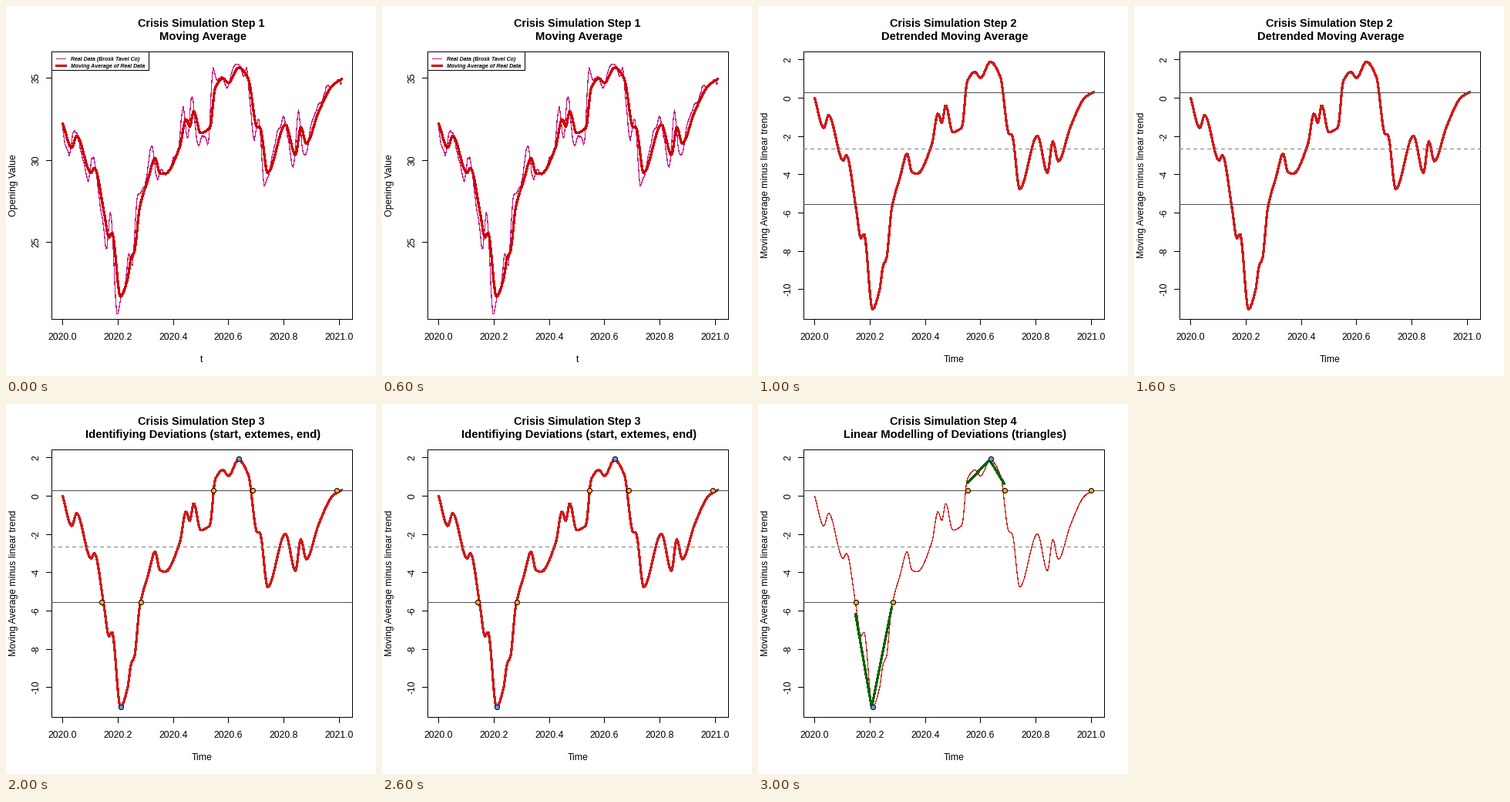
A matplotlib script that plays this animation: 480x480 px, repeating every 4 s.

```python
import numpy as np
import matplotlib.pyplot as plt
from matplotlib.animation import FuncAnimation
from matplotlib.patches import Rectangle

plt.rcParams.update({"font.family": "Liberation Sans", "path.simplify": False,
                     "toolbar": "None"})

RED, VIOLET, GREEN = "#CD0000", "#C71585", "#006400"
TREND_RED, ORANGE, BLUE = "#CD1C1C", "#FFA51A", "#6495ED"
LEFT, RIGHT, TOP, BOTTOM = 59, 449, 59, 406
UPPER, MIDDLE, LOWER = 112, 185, 257
START, END = 73, 435

# Turning points of the detrended average, in stage pixels.
TURNS = [(73, 119), (85, 158), (91, 141), (110, 200), (114, 193), (127, 264),
         (133, 301), (137, 295), (148, 393), (157, 369), (162, 336),
         (166, 328), (173, 262), (184, 221), (193, 191), (199, 215),
         (206, 217), (225, 179), (233, 139), (238, 151), (243, 128),
         (252, 163), (264, 157), (271, 97), (281, 85), (288, 93), (301, 72),
         (314, 92), (325, 165), (329, 167), (339, 237), (362, 168),
         (375, 216), (382, 175), (389, 201), (405, 156), (423, 119),
         (435, 111)]

SUBTITLES = ["Moving Average", "Detrended Moving Average",
             "Identifiying Deviations (start, extemes, end)",
             "Linear Modelling of Deviations (triangles)"]


def year_x(years):
    return START + 359 * years


def price_y(value):
    return 93 + (35 - value) * 21.33


def trend_y(value):
    return 119 - value * 24.83


def detrended(x):
    """Monotone cubic curve through the turning points."""
    px, py = np.array(TURNS, float).T
    step = np.diff(px)
    slope = np.diff(py) / step
    before, after = slope[:-1], slope[1:]
    product = before * after
    total = np.where(product > 0, before + after, 1)
    tangent = np.zeros(len(px))
    tangent[1:-1] = np.where(product > 0, 2 * product / total, 0)
    tangent[0], tangent[-1] = slope[0], slope[-1]

    x = np.clip(x, START, END)
    i = np.clip(np.searchsorted(px, x) - 1, 0, len(step) - 1)
    t = (x - px[i]) / step[i]
    eased = t * t * (3 - 2 * t)
    bend = t * (1 - t) * ((1 - t) * tangent[i] - t * tangent[i + 1])
    return py[i] + (py[i + 1] - py[i]) * eased + step[i] * bend


def moving_average(x):
    """Add the linear trend back and convert to the price scale."""
    years = (x - START) / 359
    return price_y((119 - detrended(x)) / 24.83 + 32.25 + 2.35 * years)


def prices(x):
    """Daily values lead the average, overshoot its turns and jitter."""
    noise = np.random.default_rng(4).normal(0, 6, len(x))
    jitter = np.convolve(noise, np.ones(3) / 3, "same")
    around = (moving_average(x - 2) + moving_average(x + 8)) / 2
    return 2 * moving_average(x + 3) - around + jitter


fig = plt.figure(figsize=(480 / 72, 480 / 72), dpi=72, facecolor="white")
ax = fig.add_axes([0, 0, 1, 1])


def rule(x, y, color="black", **style):
    """Straight one-pixel line on the pixel grid."""
    ax.plot(x, y, color=color, lw=1, antialiased=False,
            solid_capstyle="butt", **style)


def curve(x, y, color, pixels):
    # Unsmoothed strokes fill every pixel they touch, so draw them narrower.
    ax.plot(x, y, color=color, lw=pixels - 0.8, antialiased=False, snap=False,
            solid_capstyle="round", solid_joinstyle="round")


def frame(x, y, width, height):
    ax.add_patch(Rectangle((x, y), width, height, fc="none", ec="black",
                           lw=1, antialiased=False))


def text(x, y, label, size=12.3, ha="center", **style):
    ax.text(x, y, label, size=size, ha=ha, va="baseline",
            rotation_mode="anchor", **style)


def draw_axes(step, xlabel, ylabel, ticks, scale):
    frame(LEFT, TOP, RIGHT - LEFT, BOTTOM - TOP)
    for k in range(6):
        x = round(year_x(k / 5))
        rule([x, x], [BOTTOM, BOTTOM + 7])
        text(x, 432.5, f"{2020 + k / 5:.1f}")
    for value in ticks:
        y = round(scale(value))
        rule([LEFT - 7, LEFT], [y, y])
        text(42, y, str(value), rotation=90)
    text(253.5, 462, xlabel)
    text(13, 232, ylabel, rotation=90)
    text(253, 26.5, f"Crisis Simulation Step {step + 1}", 14.4, weight="bold")
    text(255, 43.5, SUBTITLES[step], 14.8, weight="bold")


def draw_legend():
    frame(LEFT, TOP, 126, 24)
    rows = [(68, "Real Data (Brosk Tavel Co)", VIOLET, 1),
            (77, "Moving Average of Real Data", RED, 3)]
    for y, label, color, width in rows:
        curve([65, 77], [y, y], color, width)
        text(84, y + 2.5, label, 7, "left", weight="bold", style="italic")


def draw_levels():
    for y in (UPPER, LOWER):
        rule([LEFT, RIGHT], [y, y], "#4D4D4D")
    rule([LEFT, RIGHT], [MIDDLE, MIDDLE], "#7F7F7F", linestyle=(0, (4, 4)),
         dash_capstyle="butt")


def draw_dots(shift):
    """Mark crossings and extremes; shift moves the rounded crossings."""
    crossings = [(124 + shift, LOWER), (175, LOWER), (269 + shift, UPPER),
                 (320, UPPER), (429 + shift, UPPER)]
    for points, color in ((crossings, ORANGE), ([(149, 393), (302, 71)], BLUE)):
        ax.plot(*zip(*points), "o", ms=6.2, mfc=color, mec="black", mew=1,
                zorder=3)


def draw_triangles():
    for corners in [((126, 272), (147, 393), (173, 263)),
                    ((271, 102), (300, 72), (319, 103))]:
        curve(*zip(*corners), GREEN, 3)


def draw(step):
    ax.clear()
    # Integer coordinates fall just inside pixel centres, which snap cleanly.
    ax.set(xlim=(-0.49, 479.51), ylim=(479.51, -0.49))
    ax.axis("off")
    days = np.linspace(START, END, 253)
    if step == 0:
        curve(days, prices(days), VIOLET, 1)
        curve(days, moving_average(days), RED, 3)
        draw_legend()
        draw_axes(step, "t", "Opening Value", (25, 30, 35), price_y)
        return
    last_step = step == 3
    shown = days[days <= 431] if last_step else days
    curve(shown, detrended(shown), TREND_RED, 1 if last_step else 3)
    draw_levels()
    if last_step:
        draw_triangles()
    if step >= 2:
        draw_dots(3 if last_step else 0)
    draw_axes(step, "Time", "Moving Average minus linear trend",
              range(-10, 3, 2), trend_y)


animation = FuncAnimation(fig, draw, frames=4, init_func=lambda: None,
                          interval=1000, repeat=True, repeat_delay=0)
plt.show()
```
